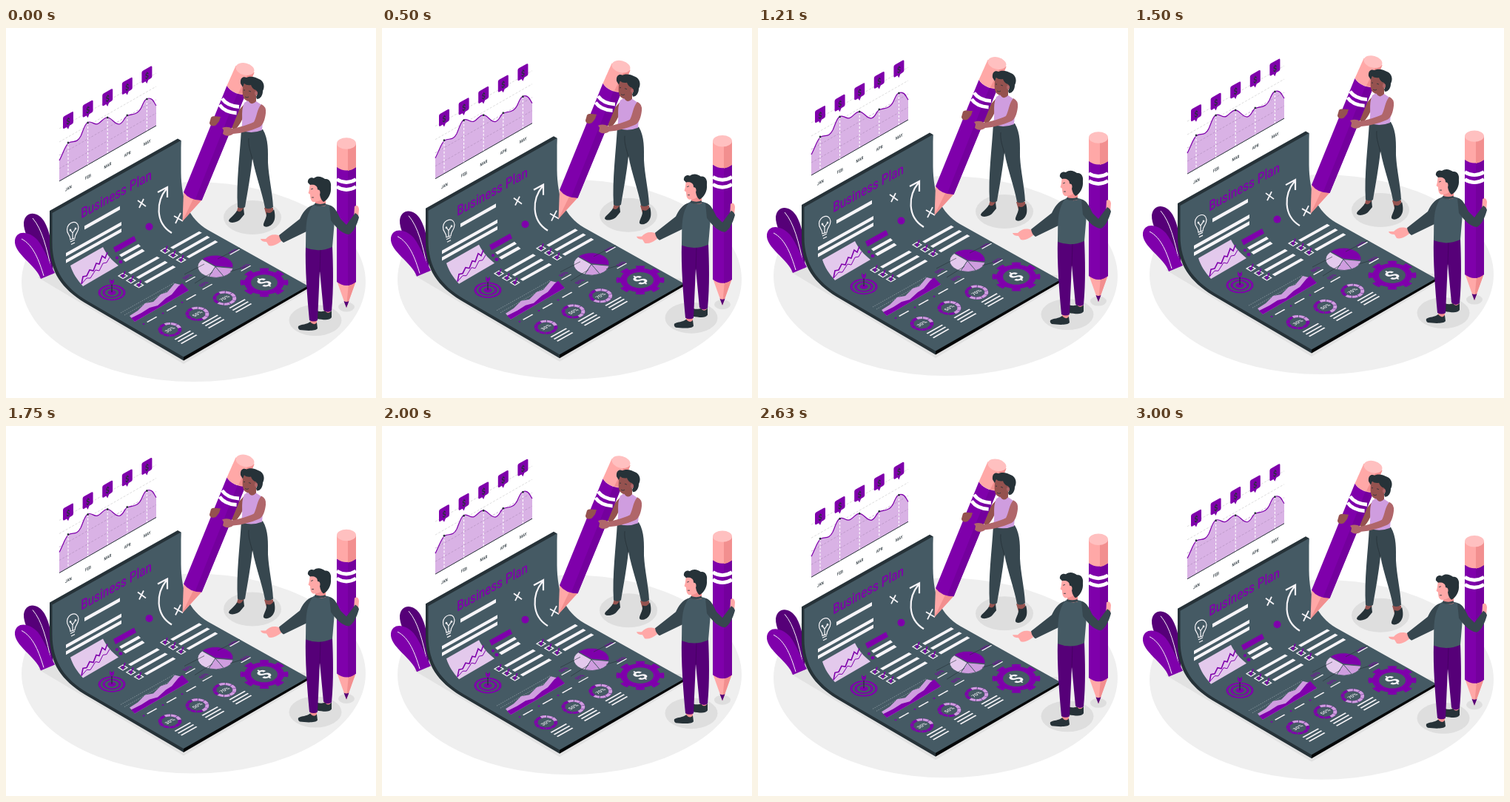
Write an HTML page that moves like this. It is 500 px wide and 500 px high and loops after 3.04 s.

```html
<!DOCTYPE html>
<html lang="en">
<head>
<meta charset="utf-8">
<title>Business plan</title>
<style>
html, body { margin: 0; width: 100%; height: 100%; overflow: hidden; background: #fff; }
svg { display: block; width: 100%; height: 100%; }
text { font-family: Roboto, Inter, sans-serif; text-anchor: middle; }
</style>
</head>
<body>
<svg viewBox="0 0 500 500"><g id="scene"></g></svg>
<script>
const purple = '#7f00ab', deep = '#74009d', plum = '#560078', lilac = '#cf9ddf', pale = '#e3c9ec',
      slate = '#455a64', ink = '#263238', trouser = '#37474f', white = '#f7f5f8',
      pink = '#ffa8a7', rose = '#f28f8f', blush = '#ffc0c0', skin = '#b0666a', shade = '#95524f';
const slope = .56;

const fill = (d, c) => `<path d="${d}" fill="${c}"/>`;
const line = (d, c, w = 1, more = '') =>
  `<path d="${d}" fill="none" stroke="${c}" stroke-width="${w}" ${more}/>`;
const oval = (x, y, rx, ry, c) => `<ellipse cx="${x}" cy="${y}" rx="${rx}" ry="${ry}" fill="${c}"/>`;
// Text standing on the wall plane or lying on the floor plane
const wallText = (s, x, y, size, c, weight = 500) =>
  `<text transform="matrix(.78 -.437 0 1 ${x} ${y})" font-size="${size}" font-weight="${weight}" fill="${c}">${s}</text>`;
const floorText = (s, x, y, size, c, weight = 500) =>
  `<text transform="matrix(.866 -.5 .8 .48 ${x} ${y})" y="${size * .36}" font-size="${size}" font-weight="${weight}" fill="${c}">${s}</text>`;
// Slanted bar; (dx, dy) is its thickness direction
const bar = (x, y, len, dx, dy, c = white) =>
  fill(`M${x} ${y}l${len} ${-len * slope}l${dx} ${dy}l${-len} ${len * slope}z`, c);
const flat = (x, y, k, body) => `<g transform="translate(${x} ${y}) scale(1 ${k})">${body}</g>`;
const spin = (deg, body) => `<g transform="rotate(${deg})">${body}</g>`;
const ring = (r, c, w, dash = '', len = 100) =>
  `<circle r="${r}" fill="none" stroke="${c}" stroke-width="${w}" pathLength="${len}" stroke-dasharray="${dash}"/>`;
const each = (n, f) => Array.from({ length: n }, (_, i) => f(i)).join('');

const ground = () =>
  oval(253.5, 343, 232.5, 135, '#efefef') +
  fill('M43 337L62 326L405 342L415 351L240 454z', '#e2e2e2') +
  oval(333, 256, 39, 23, '#dedede') + oval(418, 395, 35.5, 21, '#dedede') + oval(460, 377, 11, 6.5, '#dedede');

const leaves = () =>
  fill('M63 333C54 314 23 287 24 263C26 247 43 247 52 262C59 274 61 290 64 304z', plum) +
  line('M36 257C49 272 55 298 61 325', white) +
  fill('M47 339C41 320 10 305 12 287C14 273 31 274 43 287C53 300 58 317 66 331z', purple) +
  line('M21 285C37 293 45 315 51 335', white);

function wallChart() {
  const curve = 'M72 179C77 170 80 158 85 155C91 152 96 156 101 146C105 137 107 127 113 127' +
    'C118 127 120 132 125 129C130 126 132 121 137 121C143 121 146 130 153 130C159 129 160 119 165 118' +
    'C171 116 179 118 184 105C187 98 189 95 193 95C199 95 200 101 203 105';
  const months = ['JAN', 'FEB', 'MAR', 'APR', 'MAY'], tops = [155, 128, 121, 118, 96];
  const col = i => 84 + 26.6 * i, drop = i => 15.4 * i;
  return each(2, i => line(`M72 ${136 + 18 * i}L203 ${61 + 18 * i}`, '#d4d4d4', .8, 'stroke-dasharray="3 2"')) +
    fill(curve + 'L203 132L72 207z', '#d9b2e5') +
    each(2, i => line(`M72 ${172 + 18 * i}L203 ${97 + 18 * i}`, '#b391bf', .7, 'stroke-dasharray="3 2"')) +
    line(curve, purple, 1.2) + line('M72 207L203 132', ink, 1) +
    months.map((m, i) => {
      const x = col(i), y = 126 - drop(i);
      return line(`M${x} ${tops[i]}V${200 - drop(i)}`, '#fff', 1.1, 'stroke-dasharray="3 2"') +
        oval(x, tops[i], 1.3, 1.5, ink) +
        wallText(m, x + .3, 218.5 - drop(i), 5.8, ink) +
        fill(`M${x - 7} ${y - 4}q0 -2 2 -3l10 -5.6q2 -1 2 1v12.5q0 2 -2 3l-3 1.8l-2 5l-2 -2.8l-3 1.8q-2 1 -2 -1z`, purple) +
        wallText('$', x, y + 4, 11, ink, 700);
    }).join('');
}

const sheet = () =>
  fill('M59 247L232 149.5L236.500 152L234 200L240 444V449.500L106 371C76 352 59 331 59 292z', ink) +
  fill('M408 348V352L240 449.500V443z', '#050708') +
  fill('M62.500 250L236.500 152V195C237 234 247 257 273 273L408 348.500L240 444.500L110 369C80 351 62.500 328 62.500 290z', slate);

const header = () =>
  wallText('Business Plan', 149, 231, 19.4, purple) +
  bar(106, 267.500, 48, 0, 5) + bar(81, 304, 75, 0, 4.800) + bar(81, 313, 75, 0, 4.800) +
  line('M87 286C87 279 82 279 82.500 272C83 262 97 258 98 269C98 277 93 277 93 284zM87 289l6 -3M88 292.500l5 -2.500M90 285V277l-3 -4M90 277l4 -6', white, 1.200) +
  oval(87, 273, 1.300, 1.500, white) + oval(94, 271, 1.300, 1.500, white) +
  line('M178 233L189 241M186 231L180 243M227 254L239 261M236 250L229 264', white, 1.800) +
  line('M224 277C201 263 203 234 217 217M205 222L218 215L218 229', white, 2.200) +
  oval(193.500, 268.500, 5, 5, purple);

const miniChart = () =>
  fill('M87 321L131 296C136 306 143 314 152 321L104 349C96 340 90 331 87 321z', pale) +
  line('M102 346L104 336L109 335L113 327L118 328L122 318L126 319L130 308L134 311L137 303', purple, 1.600) +
  line('M102 346L109 338L114 338L121 327L126 328L131 318L136 317L140 310', purple, 1) +
  fill('M145 296.500L173 281L176 287.500L148 303.500z', purple) +
  oval(150, 310.500, 2, 2, purple) + oval(155, 316, 2.500, 2.300, purple) +
  bar(153, 306.500, 26, 3, 3) + bar(158, 313, 26, 3.500, 3);

const checklist = (x, y) => each(3, i => {
  const a = x + 10.8 * i, b = y + 6.2 * i;
  return line(`M${a - 6} ${b}l6 -3.500l6 3.500l-6 3.500z`, white, 1.200) +
    line(`M${a - 2} ${b - 2}l2 3.500l3 -8`, purple, 1.600) +
    bar(a + 7, b - 4.500, 39, 3.800, 2.200);
});

const target = () =>
  flat(143, 357.500, .58, ring(17, purple, 3) + ring(11, purple, 3) + `<circle r="5.500" fill="${purple}"/>`) +
  line('M143 357V341', ink, 1.300) + fill('M140 339l3 3l3 -3v5l-3 3l-3 -3z', purple);

const areaChart = () =>
  each(2, i => line(`M${155 + 5 * i} ${385 + 3 * i}l73 -41`, '#94a1a8', .8, 'stroke-dasharray="1.500 1.500"')) +
  fill('M167 389L178 382L188 372L199 370L209 360L218 357L228 345L236 347L247 354.500L174 397z', lilac) +
  fill('M169 392L183 385L194 378L205 375L216 365L224 360L233 349L238 345L247 354.500L174 397z', purple) +
  each(6, i => oval(186 + 13 * i, 400 - 7.300 * i, 1.400, 1, i % 2 ? ink : purple)) +
  each(3, i => bar(190 + 26.500 * i, 397 - 15 * i, 13, 1.300, 1));

function pie() {
  const at = a => `${24 * Math.cos(a * Math.PI / 180)} ${24 * Math.sin(a * Math.PI / 180)}`;
  const wedge = (a, b, c, x = 0, y = 0) =>
    `<path transform="translate(${x} ${y})" d="M0 0L${at(a)}A24 24 0 0 1 ${at(b)}z" fill="${c}" stroke="${slate}"/>`;
  return flat(283, 322.500, .62,
    wedge(112, 222, pale) + wedge(62, 112, lilac) + wedge(8, 62, lilac) + wedge(222, 368, purple, 0, -1)) +
    line('M286 312L316 297M303 329L330 321M268 319L241 333M279 330L255 345', ink, .6) +
    [[307, 302], [323, 322], [245, 336], [267, 346]].map(([x, y]) => floorText('50%', x, y, 6.500, purple)).join('') +
    bar(302, 306, 13, 1.200, .8) + bar(317, 328, 13, 1.200, .8) + bar(242, 343, 13, 1.200, .8) + bar(265, 353, 13, 1.200, .8);
}

const gear = () =>
  flat(349, 344, .6, `<circle r="27" fill="${purple}"/>` + spin(-11.25, ring(28.500, purple, 8, '1 1', 16)) +
    `<circle r="18" fill="${slate}"/>`) +
  floorText('$', 348.500, 344, 24, white, 700);

const donuts = () => each(3, i => {
  const x = 221.500 + 36.900 * i, y = 407.500 - 21.200 * i;
  return flat(x, y, .6, spin(-120, ring(13.500, purple, 4.800, '9 1') +
      ring(13.500, lilac, 4.900, '9 1 '.repeat([3, 5, 7][i]) + '0 100'))) +
    floorText(['30%', '50%', '70%'][i], x, y, 7, white) +
    each(3, k => bar(x + 6 + 4.200 * k, y + 13 + 2.800 * k, 21, 1.600, 1));
});

const womanLegs = () =>
  fill('M314 240L311 251L319 253L322 241zM349 243L353 257L361 254L361 243z', shade) +
  fill('M312 247C308 254 301 257 301 261C304 265 314 262 317 258L322 252L321 243C318 249 315 249 312 247z', ink) +
  fill('M352 249C353 257 347 263 348 267C351 271 359 267 361 263C364 259 364 252 362 245C359 250 356 251 352 249z', ink) +
  fill('M318 137L347 137C355 150 354 167 354 182C355 202 360 222 361 242Q355 246 350 243C346 221 338 202 333 176C331 197 326 224 323 242Q318 245 313 242C311 207 316 173 318 137z', trouser) +
  line('M328 149C327 160 331 168 333 178', ink, .8);

const womanTop = () =>
  fill('M321 104C314 111 307 120 303 133L309 138C316 132 320 122 323 115z', shade) +
  fill('M326 92L338 92L338 106L325 106z', shade) +
  fill('M322 101L327 98Q332 106 338 99L344 103L350 108C347 119 347 128 346 138Q331 144 317 138C322 128 316 114 322 101z', lilac);

const leaningPencil = () =>
  fill('M240 222L264 233L238.500 261z', pink) + fill('M254 229L264 233L238.500 261z', rose) +
  fill('M298.500 78C303 86 315 91 323.500 90L264.500 233Q248 233 240 222z', purple) +
  fill('M313 88L323.500 90L264.500 233L256 231z', deep) +
  fill('M310.500 51L298.500 78C303 86 315 91 323.500 90L335.500 60z', pink) +
  fill('M326 64L335.500 60L323.500 90L314 88z', rose) +
  '<g transform="rotate(15 323 55.500)">' + oval(323, 55.500, 12.700, 8, blush) + '</g>' +
  each(2, i => line(`M${292 - 3.400 * i} ${95.500 + 8.500 * i}q7 10 23 11`, '#fff', 4.800));

const womanFront = () =>
  fill('M277 121C280 118 284 120 290 120L288 126L284 131C280 134 275 132 275 128z', shade) +
  fill('M345 103Q352 106 351 115C350 124 347 132 342 134C330 139 319 142 307 143C302 147 296 146 293 143L294 138L292 135Q299 132 306 136C316 134 327 131 335 127C339 120 339 110 345 103z', skin) +
  fill('M320 80C319 90 320 96 325 98Q333 100 337 95L341 84L334 74L322 75z', shade) +
  fill('M317 75C316 67 321 65 325 67C331 64 338 67 342 69C349 72 350 80 347 85C347 91 344 96 339 96L338 93Q341 88 338 84C334 83 332 80 331 77Q325 78 322 75L320 80z', ink) +
  oval(338, 88, 2, 2.800, skin) +
  line('M321 84l2 0M328 85l3 1M323 93q3 2 5 0', ink, .8);

const uprightPencil = () =>
  fill('M447.500 343L472.500 343L460 378z', pink) + fill('M463 345L472.500 343L460 378z', rose) +
  fill('M456.500 369q3.500 2 7 0L460 378z', plum) +
  fill('M447 188H473V343Q460 353 447 343z', purple) + fill('M462 188H473V343Q468 347 462 348z', deep) +
  fill('M447 156H473V188Q460 197 447 188z', pink) + fill('M462 156H473V188Q468 192 462 193z', rose) +
  oval(460, 156, 13, 7.700, blush) +
  each(2, i => line(`M447 ${204.500 + 10 * i}q13 8 26 0`, '#fff', 4.800));

const man = () =>
  fill('M411 390L411 402L420 402L420 390zM429 378L431 388L438 388L439 378z', rose) +
  fill('M420 382C425 384 429 383 431 382Q435 388 440 382L440 391C437 396 428 394 420 393z', ink) +
  fill('M395 403C400 400 406 401 411 397Q416 403 420 398L421 406C418 410 405 409 397 408Q394 406 395 403z', ink) +
  fill('M405 294H441C442 320 443 352 440 382Q434 386 429 381L424 328L421 395Q416 398 410 395C407 362 404 325 405 294z', plum) +
  line('M425 300L424 330', '#43005f', .8) +
  fill('M471 241Q476 238 477 245L476 256L470 258z', pink) +
  fill('M371 281C363 278 356 279 351 285L344 285Q345 289 352 289L355 294Q362 296 372 288z', pink) +
  fill('M416 239C405 242 401 250 397 258L369 280Q370 287 375 290L406 275L414 263z', trouser) +
  fill('M415 239Q423 234 432 238C439 239 444 242 445 249L441 296Q423 304 405 297C406 276 403 255 415 239z', slate) +
  fill('M437 240C444 240 448 250 452 258Q457 263 460 266L472 250Q476 252 477 256C474 267 469 277 463 279C453 278 444 267 439 260z', trouser) +
  fill('M418 229L432 230L432 240Q424 243 418 238z', rose) + line('M417 238q8 3 15 0', trouser, 3) +
  fill('M411 209C410 216 410 220 408.500 223L411 225C411 232 413 236 418 235C425 234 429 230 430 225L427 207z', pink) +
  fill('M408 209C407 204 412 201 416 203C421 199 427 201 431 204C437 203 440 209 439 215C440 224 435 232 429 235Q425 232 424 225L421 218C421 212 415 211 411 212z', ink) +
  oval(421.500, 222.500, 3, 4, pink) +
  line('M412 218l3 -1M413 229l3 0', ink, .8);

const scene = document.getElementById('scene');
scene.innerHTML = [ground, leaves, wallChart, sheet, header, miniChart,
  () => checklist(158, 335), () => checklist(215, 301), target, areaChart, pie, gear, donuts,
  womanLegs, womanTop, leaningPencil, womanFront, uprightPencil, man].map(draw => draw()).join('');

const loop = 3040, rise = 10;
function frame() {
  const u = performance.now() % loop / loop;
  const y = -rise * (1 - Math.abs(1 - 2 * u));
  scene.setAttribute('transform', `translate(0 ${y.toFixed(2)})`);
  requestAnimationFrame(frame);
}
frame();
</script>
</body>
</html>
```
